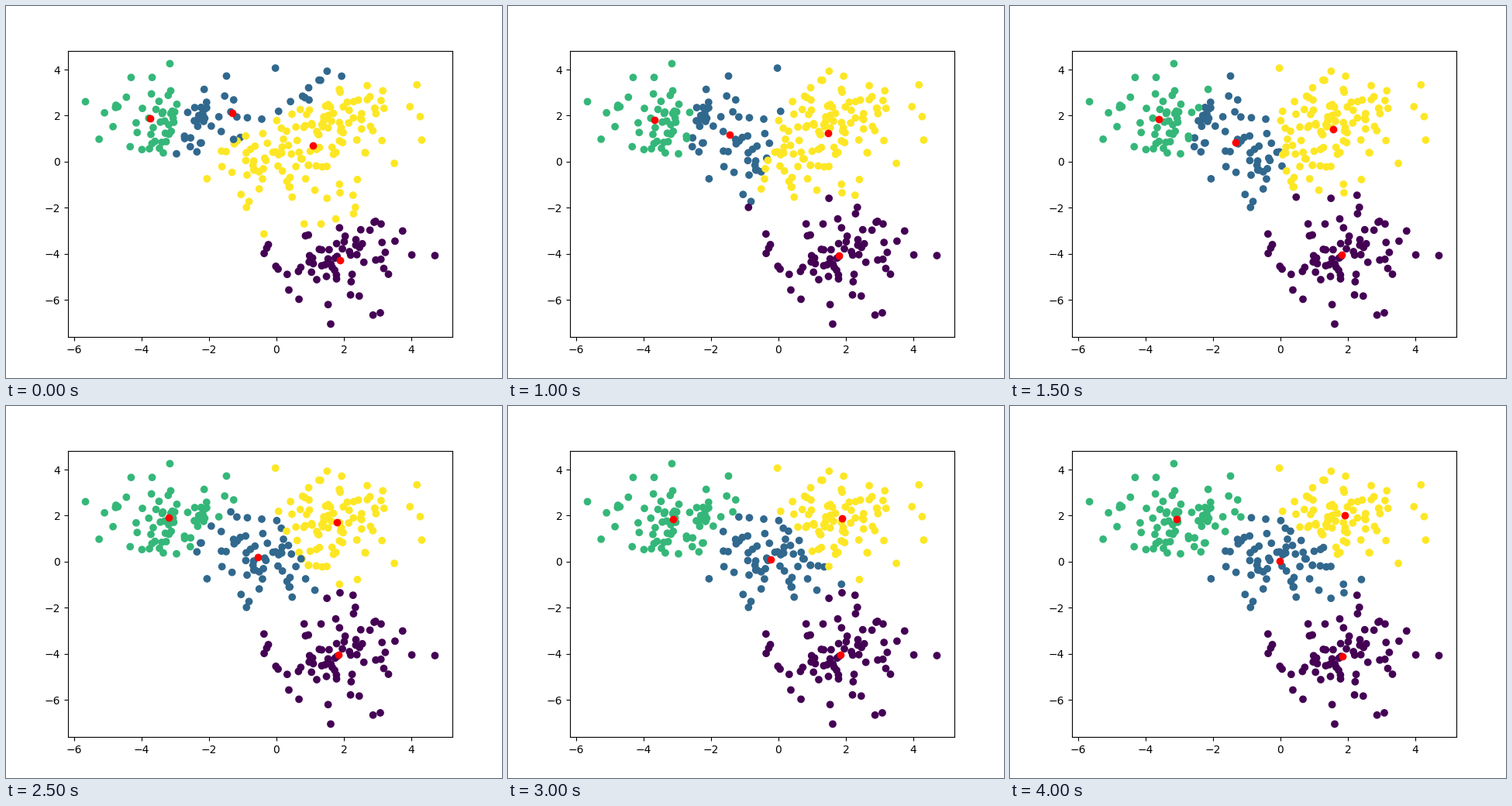
Recreate the animation shown at these times as a matplotlib script. Size 640x480 px, loop 5 s.

```python
import numpy as np
import matplotlib.pyplot as plt
from matplotlib.animation import FuncAnimation

STEPS = 9
FRAMES = 10
INTERVAL = 500

BLOBS = [(0, 0), (2, 2), (-3, 2), (2, -4)]
# starting centroids, in colour order: purple, blue, green, yellow
START = [(1.938, -6.251), (-1.5, 2.2), (-4.128, 2.568), (-0.034, 0.322)]


def make_points(per_blob=75, seed=0):
    rng = np.random.RandomState(seed)
    points = np.vstack([rng.normal(c, 1.0, (per_blob, 2)) for c in BLOBS])
    order = np.arange(len(points))
    rng.shuffle(order)
    return points[order]


def assign(points, centers):
    gaps = points[:, None, :] - centers[None, :, :]
    return (gaps ** 2).sum(axis=2).argmin(axis=1)


def lloyd(points, centers, steps):
    """Return (labels, centroids) after each step of k-means."""
    history = []
    for _ in range(steps):
        labels = assign(points, centers)
        centers = np.array([points[labels == k].mean(axis=0)
                            for k in range(len(centers))])
        history.append((labels, centers))
    return history


points = make_points()
history = lloyd(points, np.array(START), STEPS)

fig, ax = plt.subplots(figsize=(6.4, 4.8), dpi=100)
labels, centers = history[0]
dots = ax.scatter(points[:, 0], points[:, 1], c=labels,
                  cmap="viridis", vmin=0, vmax=3)
marks = ax.scatter(centers[:, 0], centers[:, 1], c="r")


def update(frame):
    labels, centers = history[min(frame, STEPS - 1)]
    dots.set_array(labels)
    marks.set_offsets(centers)
    return dots, marks


anim = FuncAnimation(fig, update, frames=FRAMES, interval=INTERVAL,
                     repeat=True, repeat_delay=0)
plt.show()
```
